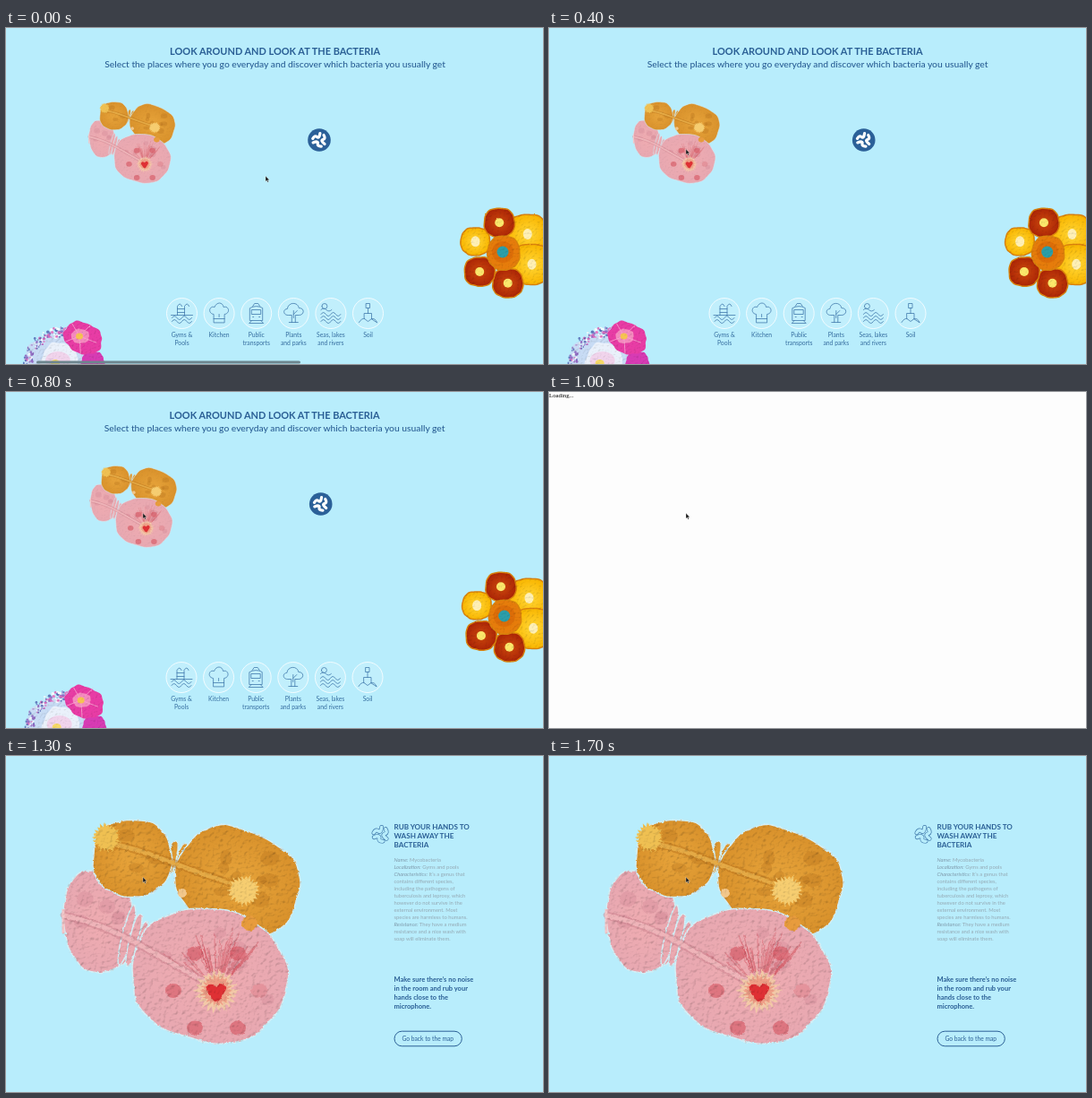
Recreate the animation shown at these times as an HTML page. Size 600 by 375 pixels, loop 1800 ms.

```html
<!DOCTYPE html>
<html lang="en">
<head>
<meta charset="utf-8">
<title>Look at the bacteria</title>
<style>
  html, body { margin: 0; width: 100%; height: 100%; overflow: hidden; background: #b8edfc; }
  svg { display: block; width: 600px; height: 375px; }
  text { font-family: Lato, sans-serif; fill: #2a5f95; }
  .line { fill: none; stroke-linecap: round; stroke-linejoin: round; }
  .place text { font-size: 6.8px; text-anchor: middle; fill: #356d9f; }
  .facts text { fill: #94a9b4; }
  .facts tspan { font-style: italic; fill: #7f9aab; }
</style>
</head>
<body>
<svg id="stage" viewBox="0 0 600 375"></svg>
<script>
let seed = 7;
const random = () => (seed = seed * 16807 % 2147483647) / 2147483647;
const between = (a, b) => a + (b - a) * random();
const times = (n, make) => Array.from({ length: n }, (_, i) => make(i)).join('');
const polar = (x, y, r, degrees) => {
  const a = degrees * Math.PI / 180;
  return [x + r * Math.cos(a), y + r * Math.sin(a)];
};

const oval = (x, y, rx, ry, fill, opacity = 1) =>
  `<ellipse cx="${x}" cy="${y}" rx="${rx}" ry="${ry}" fill="${fill}" opacity="${opacity}"/>`;
const line = (d, color, width, extra = '') =>
  `<path class="line" d="${d}" stroke="${color}" stroke-width="${width}" ${extra}/>`;
const text = (x, y, size, weight, content, extra = '') =>
  `<text x="${x}" y="${y}" font-size="${size}" font-weight="${weight}" ${extra}>${content}</text>`;
const paragraph = (y, pitch, size, weight, lines) =>
  lines.map((content, i) => text(433.5, y + i * pitch, size, weight, content)).join('');

// Rounded cell: a superellipse with a slightly wavy rim
function lobe(x, y, rx, ry, fill, { turn = 0, bulge = 2.2, wave = .015, edge = '#d3eff6' } = {}) {
  const phase = between(0, 6);
  const power = v => Math.sign(v) * Math.abs(v) ** (2 / bulge);
  const points = Array.from({ length: 90 }, (_, i) => {
    const a = i * Math.PI / 45;
    const k = 1 + wave * (Math.sin(5 * a + phase) + .6 * Math.sin(11 * a + 2 * phase));
    return `${rx * k * power(Math.cos(a))},${ry * k * power(Math.sin(a))}`;
  });
  return `<polygon points="${points.join(' ')}" fill="${fill}" stroke="${edge}" stroke-width="1.5"
    transform="translate(${x} ${y}) rotate(${turn})"/>`;
}

function burst(x, y, r, fill) {
  const points = Array.from({ length: 44 }, (_, i) =>
    polar(x, y, r * (i % 2 ? between(.7, .85) : between(.95, 1.15)), i * 360 / 44));
  return `<polygon points="${points.join(' ')}" fill="${fill}"/>`;
}

const ridge = (d, shade, tone) => line(d, shade, 9, 'opacity=".5"') + line(d, tone, 5);
const warts = (n, x, y, rx, ry, color) => times(n, () => {
  const [dx, dy] = polar(0, 0, Math.sqrt(random()), between(0, 360));
  return oval(x + dx * rx, y + dy * ry, between(5, 11), between(5, 9), color, .35);
});

function mycobacteria() {
  const orange = 'url(#orange)', pink = 'url(#pink)';
  const star = [235, 262];
  const streaks = times(40, () => {
    const angle = between(-145, -40);
    return line(`M${polar(...star, 22, angle)}L${polar(...star, between(38, 75), angle)}`, '#d5606b', 1.2, 'opacity=".5"');
  });
  const redSpots = times(6, i => oval(...polar(...star, 48, i * 60), 9, 8, '#d5535f', i ? .6 : .25));
  return `<g id="mycobacteria" filter="url(#rough)">
    ${lobe(104, 184, 39, 57, pink, { turn: -6, bulge: 2.5 })}
    ${times(3, i => lobe(135 + i * 8, 200 + i * 5, 5, 34 - i * 4, pink, { turn: 14 }))}
    ${times(3, i => lobe(185 + i * 10, 115 + i * 3, 5, 21, orange, { turn: 14 }))}
    ${lobe(141, 114, 44, 43, orange, { bulge: 2.3 })}
    ${lobe(259, 140, 70, 57, orange, { turn: 24, bulge: 2.4 })}
    ${warts(8, 259, 138, 50, 38, '#b8721c')}${warts(4, 142, 112, 28, 28, '#b8721c')}
    ${ridge('M106 95Q145 103 178 116T260 145', '#b9741c', '#e5aa45')}
    ${burst(112, 91, 15, '#efc052')}${burst(266, 150, 17, '#f6cd70')}
    ${oval(197, 153, 5, 5, '#f2c78b')}
    ${lobe(227, 245, 87, 74, pink, { turn: 12, bulge: 2.2 })}
    ${oval(272, 187, 9, 8, '#e89c3d')}
    ${warts(10, 230, 245, 70, 58, '#d28896')}${warts(5, 102, 184, 25, 40, '#d28896')}
    ${streaks}${redSpots}
    ${ridge('M65 178Q110 188 148 210T222 252', '#cb818e', '#efb4b9')}
    ${line('M64 171V197', '#f4c7c9', 3)}
    ${burst(...star, 23, '#f3c9a8')}${burst(...star, 17, '#ee9e86')}
    ${line('M229 260Q235 266 241 259L235 269Z', '#df3034', 10)}
  </g>`;
}

function flower() {
  const center = [556, 251];
  const petals = [...'yyyrrr'].map((kind, i) => {
    const red = kind === 'r', angle = (red ? [-98, 82, 142] : [-38, 22, 202])[i % 3];
    const [x, y] = polar(...center, 34, angle);
    const size = red ? 17 : 20 + 4 * Math.cos(angle * Math.PI / 180);
    return lobe(x, y, size, size * .95, red ? 'url(#red)' : 'url(#yellow)', { bulge: 2.4, edge: '#d9820c' })
      + (red ? oval(x, y, 5, 5, '#fbe76b') : oval(x, y, 5, 6, '#fff3c4', .9));
  }).join('');
  return `<g filter="url(#fine)">${petals}
    ${lobe(...center, 18, 19, '#e67c0b', { edge: '#d9820c' })}
    ${oval(555, 250, 12, 12, '#d76507', .65)}${oval(555, 250, 6.5, 6.5, '#2b9ea9')}
  </g>`;
}

function colony() {
  const colors = ['#5269b4', '#8c5fbd', '#e469bd', '#ffffff'];
  const specks = times(130, i => {
    const [x, y] = polar(64, 380, 45 * between(.78, 1.03), between(175, 290));
    return oval(x, y, between(.6, 2), between(.6, 1.8), colors[i % 4], .85);
  });
  const pale = { edge: 'none', wave: .04 };
  return `<g filter="url(#fine)">
    ${lobe(62, 382, 42, 43, '#c8dcf5', pale)}${specks}
    ${lobe(60, 376, 21, 25, '#eaf1fb', pale)}${oval(58, 371, 14, 10, '#f4c8e5', .7)}${oval(55, 374, 5, 4, '#f6d968')}
    ${lobe(97, 373, 13, 12, '#d73bb4', pale)}${lobe(86, 346, 22, 17, '#e83ca5', { ...pale, turn: 25 })}
    ${lobe(83, 344, 10, 8, '#f58abf', pale)}
    ${times(5, i => line(`M82 344L${polar(84, 345, 18, 20 + i * 72)}`, '#f8a6d1', .8))}
    ${oval(82, 344, 4, 3.5, '#f6c352')}
  </g>`;
}

// Three bent rods around a centre
const rods = (color, width) => times(3, i =>
  line('M-5.5-5Q-1.5-7.5-.5-4.2T4.5-6', color, width, `transform="rotate(${i * 120 - 30})"`));

const waves = (y, n = 3) => times(n, i => `M-11 ${y + i * 4}q2.7-4 5.5 0t5.5 0 5.5 0 5.5 0`);
const places = [
  ['Gyms &amp;', 'Pools', waves(5, 2) + 'M-12 2h24M-5 2V-8q3-5 5 0M3 2V-8q3-5 5 0M-5-5h8M-5-1h8'],
  ['Kitchen', '', 'M-6 10V1C-13 0-11-9-5-7-3-13 4-13 5-7 11-9 13 0 6 1V10ZM-6 6H6M0 1v3'],
  ['Public', 'transports', 'M-7-6q7-4 14 0V8H-7ZM-5-4H5V1H-5ZM-4-8l2-3h4l2 3M-5 8l-3 3H8L5 8M-4 4h1M3 4h1'],
  ['Plants', 'and parks', 'M-2 10V2H-6C-12 2-12-5-7-5-6-13 5-13 6-6 13-6 12 2 6 2H2V10M-5 10H5M0 5V-3M0 1l4-4'],
  ['Seas, lakes', 'and rivers', waves(1) + 'M-11-4q3-3 6 0t6 0M-10-8a3 3 0 1 0 6 0 3 3 0 1 0-6 0'],
  ['Soil', '', 'M-2-11h4v5h-4ZM0-6V0M-4 0H4V6L0 9-4 6ZM-10 10q3-5 6-4M4 6q4-1 6 4Z']
].map(([first, second, icon], i) => `<g class="place" transform="translate(${196.5 + i * 41.6} 318.5)">
    <circle r="17" fill="#c1effc" stroke="#fff" stroke-width=".8"/>
    ${line(icon, '#3b75a8', .75)}<text y="26.5">${first}</text><text y="35.8">${second}</text>
  </g>`).join('');

const facts = [
  'Name: Mycobacteria', 'Localization: Gyms and pools', 'Characteristics: It’s a genus that',
  'contains different species,', 'including the pathogens of', 'tuberculosis and leprosy, which',
  'however do not survive in the', 'external environment. Most', 'species are harmless to humans.',
  'Resistance: They have a medium', 'resistance and a nice wash with', 'soap will eliminate them.'
].map(fact => fact.replace(/^\w+:/, '<tspan>$&</tspan>'));

const gradient = (id, inner, outer) =>
  `<radialGradient id="${id}"><stop offset=".2" stop-color="${inner}"/><stop offset="1" stop-color="${outer}"/></radialGradient>`;
const texture = (id, frequency, shift, relief) => `
  <filter id="${id}" color-interpolation-filters="sRGB">
    <feTurbulence type="fractalNoise" baseFrequency="${frequency}" numOctaves="3" seed="4" result="noise"/>
    <feDisplacementMap in="SourceGraphic" in2="noise" scale="${shift}" xChannelSelector="R" yChannelSelector="G" result="shape"/>
    <feDiffuseLighting in="noise" surfaceScale="${relief}" diffuseConstant="1.2" lighting-color="#fff" result="light">
      <feDistantLight azimuth="235" elevation="57"/>
    </feDiffuseLighting>
    <feComposite in="shape" in2="light" operator="arithmetic" k1="1"/>
  </filter>`;

const centered = 'text-anchor="middle"';
document.getElementById('stage').innerHTML = `
  <defs>
    ${gradient('orange', '#e5a138', '#d9922c')}${gradient('pink', '#eeabb1', '#e8a8b1')}
    ${gradient('yellow', '#ffd12c', '#f9b600')}${gradient('red', '#c6420b', '#ac2506')}
    ${texture('rough', .22, 3, .6)}${texture('fine', .4, 1.5, .4)}
    ${mycobacteria()}
  </defs>
  <g id="map">
    <g id="scene">
      <use href="#mycobacteria" transform="translate(69.4 56.5) scale(.364)"/>
      <g transform="translate(350 125)"><circle r="12.8" fill="#2b6098"/>${rods('#fff', 3.2)}</g>
      ${flower()}${colony()}
    </g>
    <g id="interface">
      ${text(300.6, 30, 10.95, 700, 'LOOK AROUND AND LOOK AT THE BACTERIA', centered)}
      ${text(300.6, 43.5, 10.3, 500, 'Select the places where you go everyday and discover which bacteria you usually get', centered)}
      ${places}
    </g>
    <rect id="scrollbar" x="34" y="371.4" width="295" height="3.2" rx="1.6" fill="#6d858e"/>
  </g>
  <g id="loading">
    <rect width="600" height="375" fill="#fdfdfd"/>
    <text y="5.9" font-size="6.8" style="font-family:'Liberation Serif',serif;fill:#000">Loading...</text>
  </g>
  <g id="detail">
    <use href="#mycobacteria"/>
    <g transform="translate(418.7 87.5) scale(1.08)">${rods('#3b75a8', 4.4)}${rods('#b8edfc', 3.2)}</g>
    ${paragraph(81.7, 9.9, 8.1, 700, ['RUB YOUR HANDS TO', 'WASH AWAY THE', 'BACTERIA'])}
    <g class="facts">${paragraph(117.6, 8.02, 5.85, 400, facts)}</g>
    ${paragraph(251.6, 10, 7.5, 700, ['Make sure there’s no noise', 'in the room and rub your', 'hands close to the', 'microphone.'])}
    <rect x="434" y="307.2" width="75.3" height="16.6" rx="8.3" fill="none" stroke="#2a5f95"/>
    ${text(471.2, 318, 6.7, 400, 'Go back to the map', centered)}
  </g>
  <path id="cursor" d="M0 0v6l1.4-1.2 1 2.2 1-.5-1-2.1h1.9z" fill="#111" stroke="#fff" stroke-width=".35"/>`;

const part = id => document.getElementById(id);
const show = (id, visible) => part(id).setAttribute('display', visible ? 'inline' : 'none');
const move = (id, x, y) => part(id).setAttribute('transform', `translate(${x} ${y})`);

function draw(now) {
  const t = Math.floor(now % 1800 / 100) * 100;
  const p = Math.min(1, Math.max(0, (t - 100) / 300));
  const ease = p * p * (3 - 2 * p);
  show('map', t < 1000);
  show('loading', t === 1000);
  show('detail', t > 1000);
  move('scene', 1.7 * ease, 0);
  move('interface', -.5 * ease, 0);
  move('cursor', 290 - 137 * ease, 165.3 - 30 * ease);
  part('scrollbar').setAttribute('opacity', 1 - ease);
}

const start = performance.now();
function tick() {
  draw(performance.now() - start);
  requestAnimationFrame(tick);
}
tick();
</script>
</body>
</html>
```
